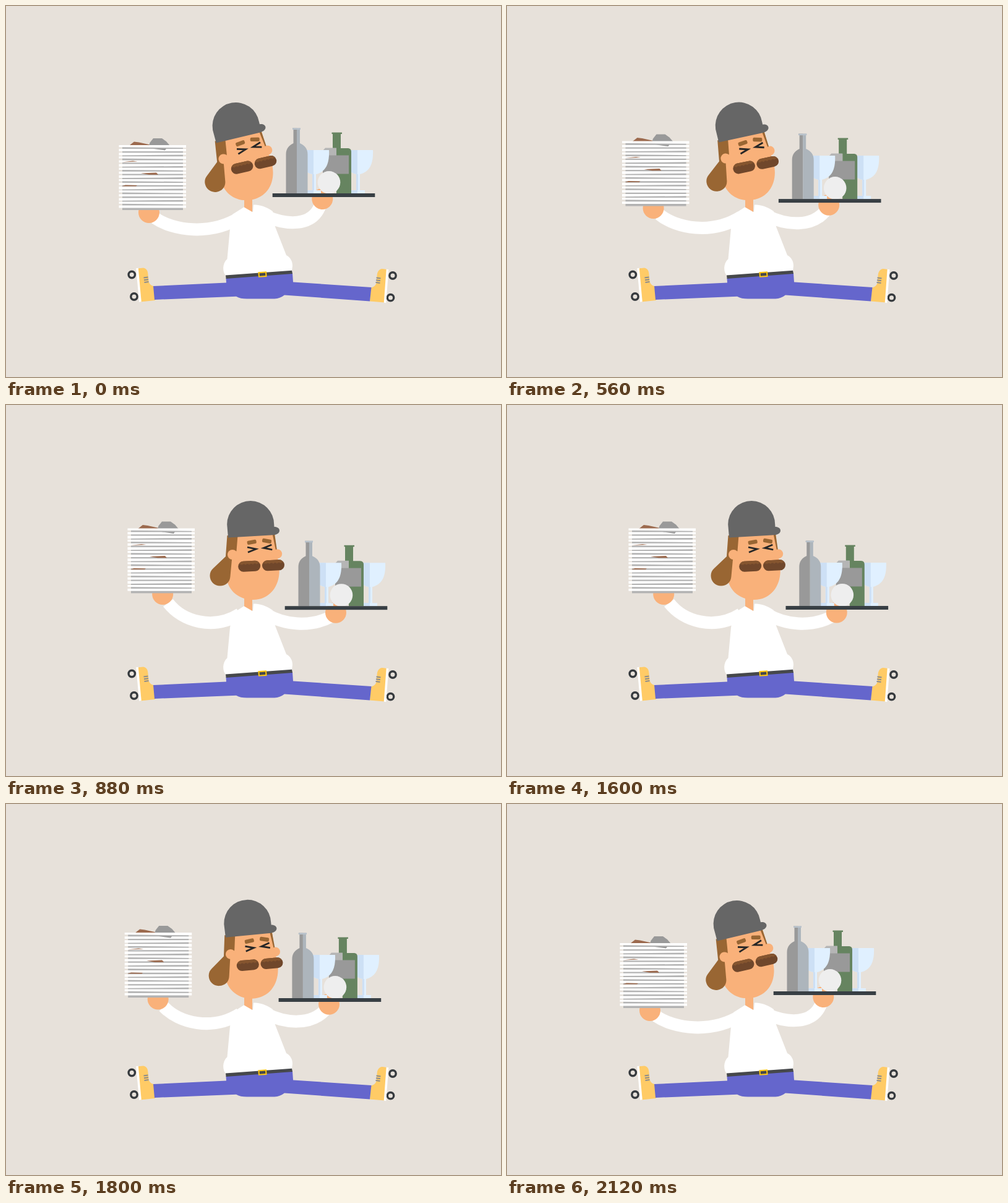
Write an HTML page that moves like this. It is 800x600 px and loops after 4 s.

```html
<!DOCTYPE html>
<html lang="en">
<head>
<meta charset="utf-8">
<title>Balancing waiter</title>
<style>
html, body { margin: 0; width: 100%; height: 100%; overflow: hidden; background: #e7e1da; }
svg { display: block; width: 100vw; height: 100vh; }
</style>
</head>
<body>
<svg viewBox="0 0 800 600">
  <defs>
    <g id="glass">
      <path d="M-24 233H24C25 255 19 268 3 272V298H11V303H-11V298H-3V272C-19 268 -25 255 -24 233Z" fill="#e0f0ff"/>
      <path d="M-24 233H-1V272H0V298H-1V303H-11V298H-3V272C-19 268 -25 255 -24 233Z" fill="#cde0f5"/>
    </g>
    <g id="whisker">
      <rect x="-18" y="-8.5" width="36" height="17" rx="8.5" fill="#70472b"/>
      <path d="M-17 -2.5C-15.5 -6.5 -13 -8.5 -9.5 -8.5H9.5C13 -8.5 15.5 -6.5 17 -2.5Q14.5 -5.5 12 -2.5Q9 -5.5 6 -2.5Q3 -5.5 0 -2.5Q-3 -5.5 -6 -2.5Q-9 -5.5 -12 -2.5Q-14.5 -5.5 -17 -2.5Z" fill="#85552f"/>
    </g>
  </defs>

  <!-- skates -->
  <g fill="none" stroke="#363a3e" stroke-width="3.4">
    <circle cx="203.3" cy="434.5" r="5.2"/><circle cx="207" cy="470" r="5.2"/>
    <circle cx="625" cy="436" r="5.2"/><circle cx="621.5" cy="471.7" r="5.2"/>
  </g>
  <path d="M212 424.5L222 423.5C227 424 229.500 429 229.500 434L230.500 444C231 449 234 452 238.500 453L241 476L217 478.500Z
    M616 426L608 425C603 425.500 600 430 599.700 435L598.700 447C598 451 595 454.500 590 455.500L588 477.500L612 479.500Z" fill="#ffcb66"/>
  <path d="M212 424L217 478.500M616.500 426L612.500 480" stroke="#fff" stroke-width="3.6"/>
  <path d="M222.500 439.500L229.500 438.500M223 443.200L230 442.200M223.500 446.900L230.500 445.900
    M598.500 439.500L605.500 440.500M598 443.200L605 444.200M597.500 446.900L604.500 447.900" stroke="#8c8c8c" stroke-width="2"/>

  <!-- trousers -->
  <path d="M355.500 440L463 432L464 446.500L590.500 455L588 477.500L450 467.500C445 471 440 473.500 434 473.500H389C382 473.500 377 472.500 372 469.700L240 475L238 453L356 447.500Z" fill="#6566cc"/>

  <!-- arms and shirt -->
  <g fill="none" stroke="#fff" stroke-width="20">
    <path id="armL"/><path id="armR"/>
  </g>
  <path d="M385 325L399 333L400 321.500C410 321.500 420 324 431 332L435 357L453 403C460 407 463 413 463 420L462 429L355 436C350 430 349 417 357.500 409L362 360L366 337Z" fill="#fff"/>
  <path d="M355 435.500L462 427.800L463 433L355.700 441Z" fill="#46484b"/>
  <rect x="408.700" y="430.800" width="11.600" height="6.600" fill="#46484b" stroke="#ffc814" stroke-width="2" transform="rotate(-4 414.500 434)"/>
  <path d="M385 300H398V333L385 325.500Z" fill="#f9b17a"/>

  <!-- head -->
  <g id="head">
    <path d="M366 205H434L437 234L441.500 262C444 290 428 315 399 315C374 315 356 297 356 274L363 250Z" fill="#f9b17a"/>
    <path d="M357.500 211H374.500L372.500 236L365 250L362.500 277C362 287 354.500 292.500 346 292.500C336.500 292.500 329.500 285 329.500 276C329.500 271 331.500 267 335 264L355 245Z" fill="#996633"/>
    <path d="M430.500 208H434L438 235H436Z" fill="#996633"/>
    <circle cx="366" cy="242" r="8" fill="#f9b17a"/>
    <circle cx="438.700" cy="240.700" r="7.500" fill="#f9b17a"/>
    <g fill="#996633">
      <rect x="389.700" y="218.700" width="15" height="6.400" rx="2" transform="rotate(-10 397 222)"/>
      <rect x="414" y="216.700" width="15" height="6.400" rx="2" transform="rotate(10 421.500 220)"/>
    </g>
    <path d="M390 230L404 233L391 238.300M429.300 226L416.500 231.200L430.300 234" fill="none" stroke="#262626" stroke-width="2.800"/>
    <use href="#whisker" transform="translate(393.200 260.800) rotate(-3)"/>
    <use href="#whisker" transform="translate(432 259.200) rotate(-3)"/>
    <path d="M359 214.500L357.200 193A38 38 0 0 1 433.200 193L433.500 197C438.500 197 442 199.500 442 203C442 207 438 209.700 432 210.200Z" fill="#666"/>
  </g>

  <!-- stack of plates -->
  <circle id="handL" r="17" fill="#f9b17a"/>
  <g id="stack">
    <path d="M197.500 227L207 219.500L215 220.500L233 224.500V227Z" fill="#9c6a4e"/>
    <path d="M231 226L232.500 221L238 214H252L259 219L265 226Z" fill="#999"/>
    <g id="plates"></g>
    <path d="M237 230.800H259L257 233.500Z" fill="#999"/>
    <path d="M218 270.500L243 269.500L246 272.800H231Z M187 291.500L193 289.500L212 290L210 291.500Z M187 252.500L205 250.500L213 251.500Z" fill="#9c6a4e"/>
  </g>

  <!-- tray -->
  <circle id="handR" r="17" fill="#f9b17a"/>
  <g id="tray">
    <use href="#glass" x="569"/>
    <path d="M528 207V230H534V303H558V236C558 232 556 230 552 230H541V207H543V204.500H526.500V207Z" fill="#668460"/>
    <path d="M516 229.500H534V243H512V234Z" fill="#b5b5b5"/>
    <rect x="512" y="241.500" width="42" height="30" fill="#999"/>
    <use href="#glass" x="498"/>
    <path d="M452.500 303V240C452.500 230 458 225 464.500 222V200H463V197.500H470V303Z" fill="#999"/>
    <path d="M470 303V197.500H476V200H475V222C482 225 487.500 230 487.500 240V303Z" fill="#adb5bc"/>
    <path d="M463 197.500H476V200H463Z" fill="#b9c3cc"/>
    <circle cx="522" cy="285.300" r="18.300" fill="#eee"/>
    <rect x="430.700" y="303" width="165.600" height="6" fill="#383f44"/>
  </g>
</svg>
<script>
const LOOP = 4000;
const $ = id => document.getElementById(id);
const mix = (a, b, k) => a + (b - a) * k;

function buildPlates() {
  let out = '<rect x="188" y="226" width="98" height="104" fill="#b3b3b3"/>';
  for (let i = 0; i < 17; i++) {
    const y = 225 + i * 6.1, tilt = (i % 3 - 1) * 0.5;
    out += `<path d="M182.500 ${y}H291V${y + 3.8 - tilt}L182.500 ${y + 3.8 + tilt}Z" fill="#fff"/>`;
  }
  $('plates').innerHTML = out;
}

function ease(p) {
  p = Math.min(1, Math.max(0, p));
  return p < 0.5 ? Math.pow(2 * p, 2.2) / 2 : 1 - Math.pow(2 - 2 * p, 2.2) / 2;
}

// 0 = leaning left, 1 = leaning right; parts follow one another by `lag`
const lean = (t, lag) => ease((t - 360 - lag) / 440) - ease((t - 1560 - lag) / 480);

function bend(id, from, to, k) {
  const p = from.map((v, i) => mix(v, to[i], k).toFixed(2));
  $(id).setAttribute('d', `M${p[0]} ${p[1]}C${p.slice(2).join(' ')}`);
}

function place(id, x, y) {
  $(id).setAttribute('transform', `translate(${x.toFixed(2)} ${y.toFixed(2)})`);
}

function draw(t) {
  const tray = lean(t, 0), stack = lean(t, 40), head = lean(t, 80);
  place('tray', 20 * tray, 22.2 * tray);
  place('handR', mix(511.3, 533, tray), mix(312, 335.7, tray));
  bend('armR', [508, 322, 495, 358, 452, 354, 420, 340], [526, 342, 492, 360, 450, 356, 420, 338], tray);

  place('stack', 14 * stack, -25.6 * stack);
  place('handL', mix(231, 253.2, stack), mix(334, 306, stack));
  bend('armL', [241, 343, 270, 363, 330, 372, 378, 342], [262, 320, 285, 350, 335, 365, 378, 338], stack);

  $('head').setAttribute('transform', `rotate(${(-10.2 * (1 - head)).toFixed(3)} 389 326)`);
}

function tick() {
  draw(performance.now() % LOOP);
  requestAnimationFrame(tick);
}

buildPlates();
tick();
</script>
</body>
</html>
```
